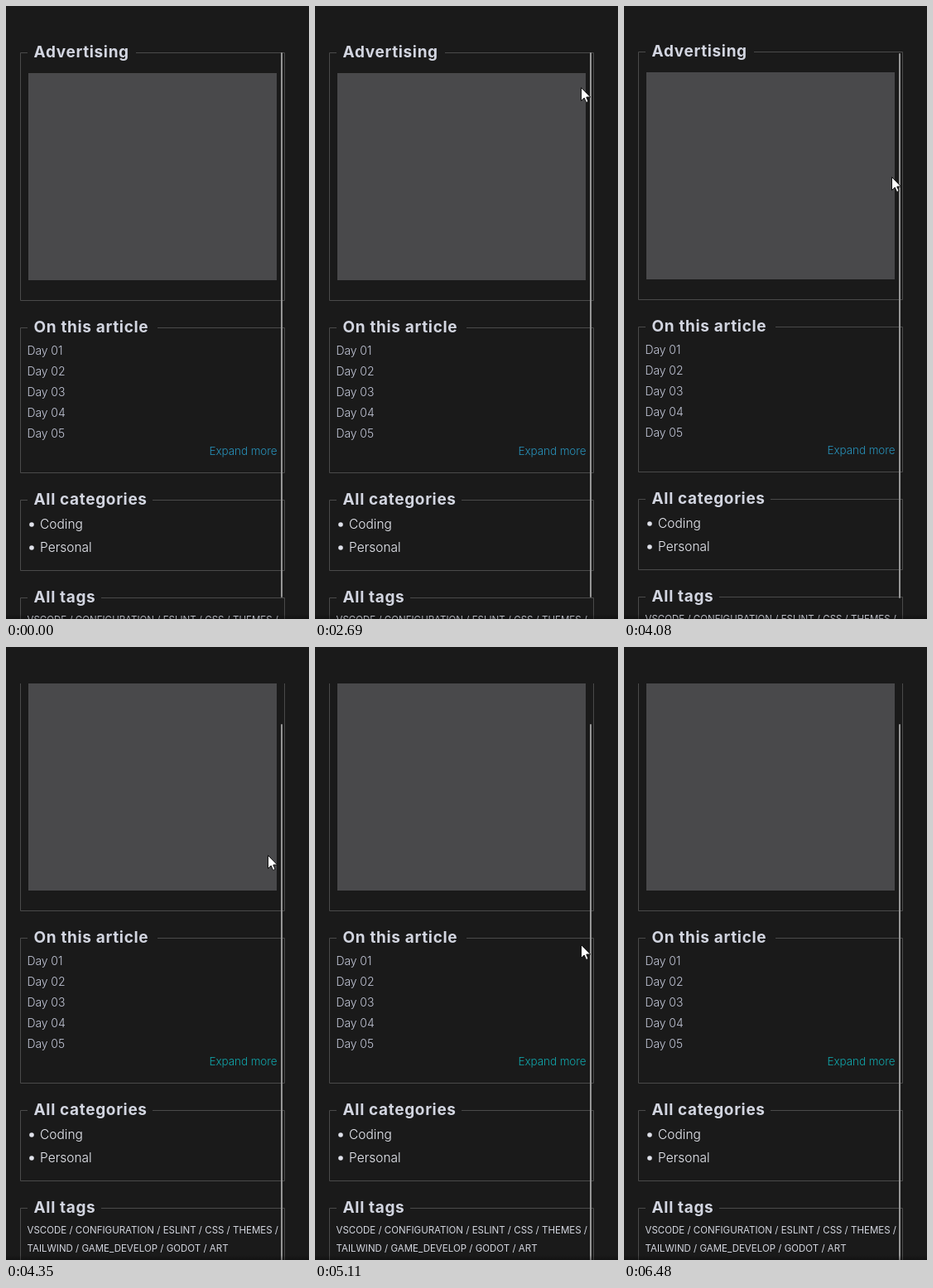
An HTML page that plays this animation: 366 by 740 pixels, repeating every 7010 ms.

```html
<!DOCTYPE html>
<html lang="en">
<head>
<meta charset="utf-8">
<title>Sidebar scroll</title>
<style>
  html, body { margin: 0; width: 100%; height: 100%; overflow: hidden; background: #1a1a1a; }
  svg { display: block; width: 366px; height: 740px; font-family: Inter, sans-serif; }
  .card { fill: none; stroke: #4a4a4a; }
  .title { font-size: 19px; font-weight: 700; letter-spacing: .65px; fill: #d2d5e0; }
  .day { font-size: 14px; font-weight: 300; letter-spacing: -.1px; fill: #c3c7d8; }
  .more { font-size: 13.5px; font-weight: 300; letter-spacing: -.1px; text-anchor: end; }
  .item { font-size: 15.5px; font-weight: 300; fill: #eceef5; }
  .tag { font-size: 11.5px; font-weight: 400; fill: #d4d7e0; }
</style>
</head>
<body>
<svg viewBox="0 0 366 740">
  <defs>
    <clipPath id="panel"><rect y="44" width="366" height="719"/></clipPath>
    <linearGradient id="shade" x2="0" y2="1">
      <stop stop-opacity="0"/><stop offset="1" stop-opacity=".3"/>
    </linearGradient>
  </defs>
  <rect width="366" height="740" fill="#1a1a1a"/>
  <g id="page" clip-path="url(#panel)">
    <g id="content"></g>
    <g id="track">
      <rect x="325" y="44" width="12" height="719" rx="6" fill="#171717"/>
      <path d="M331 47.5l3.5 5h-7z" fill="#959595"/>
    </g>
    <rect id="thumb" height="658" fill="#969696"/>
  </g>
  <rect y="734" width="366" height="6" fill="url(#shade)"/>
  <g id="toTop">
    <circle r="19" fill="#079b9d"/>
    <path d="M-7 0L0 -7L7 0M0 -7V8" fill="none" stroke="#14262b" stroke-width="2.5"/>
  </g>
  <path id="cursor" d="M.5 .5V16.5L4.2 13L6.6 18.5L9.1 17.4L6.8 12H11.7Z" fill="#fff" stroke="#111"/>
</svg>
<script>
const LOOP = 7010, TICK = 68.8, TICK_START = 1450;
const $ = id => document.getElementById(id);
const content = $('content');

function add(tag, attrs, text = '') {
  const el = document.createElementNS('http://www.w3.org/2000/svg', tag);
  for (const [k, v] of Object.entries(attrs)) el.setAttribute(k, v);
  el.textContent = text;
  content.append(el);
  return el;
}
const label = (cls, x, y, text) => add('text', { class: cls, x, y }, text);

function card(title, top, height, gapEnd) {
  add('path', { class: 'card', d: `M26 ${top}H17.5v${height}h319v${-height}H${gapEnd}` });
  label('title', 33.5, top + 5.5, title);
}

card('Advertising', 56.5, 299, 157);
card('On this article', 388.5, 175, 183);
card('All categories', 596.5, 85, 177);
card('All tags', 714.5, 73, 115);
add('rect', { x: 27, y: 81, width: 300, height: 250, fill: '#49494b' });
for (let i = 0; i < 5; i++) label('day', 25.5, 421 + 25 * i, `Day 0${i + 1}`);
const more = label('more', 327.5, 542, 'Expand more');
['Coding', 'Personal'].forEach((name, i) => {
  add('circle', { cx: 31, cy: 626 + 28 * i, r: 2.8, fill: '#dfe1ea' });
  label('item', 41, 631 + 28 * i, name);
});
['VSCODE / CONFIGURATION / ESLINT / CSS / THEMES /', 'TAILWIND / GAME_DEVELOP / GODOT / ART']
  .forEach((line, i) => label('tag', 25.5, 745 + 22 * i, line));

const linear = p => p;
const smooth = p => p * p * (3 - 2 * p);
const easeOut = p => 1 - (1 - p) ** 3;
const progress = (t, start, end) => Math.min(1, Math.max(0, (t - start) / (end - start)));
const ramp = (t, start, end) => smooth(progress(t, start, end));

// A stroke is a quadratic curve; without a bend it runs straight.
const stroke = (start, end, a, b, ease = linear, bend = [(a[0] + b[0]) / 2, (a[1] + b[1]) / 2]) => ({
  start, end,
  at(t) {
    const p = ease(progress(t, start, end)), q = 1 - p;
    return a.map((v, k) => Math.round(q * q * v + 2 * p * q * bend[k] + p * p * b[k]));
  }
});

// The pointer is visible from the first to the last moment of each visit.
const visits = [
  [stroke(142, 280, [258, 686], [-42, 356])],
  [
    stroke(1450, 2688, [7, 40], [321, 98], easeOut, [164, 2]),
    stroke(2688, 2894, [321, 98], [334, 108]),
    stroke(3180, 4060, [334, 108], [323, 205], smooth, [278, 150]),
    stroke(4060, 4610, [323, 205], [310, 295]),
    stroke(4610, 5096, [310, 295], [321, 359]),
    stroke(5096, 5790, [321, 359], [362, 420], smooth)
  ],
  [stroke(5990, 6440, [335, 430], [337, 492], linear, [298, 461])]
];

function pointerAt(t) {
  const visit = visits.find(v => t >= v[0].start && t < v.at(-1).end);
  return visit && visit.findLast(s => s.start <= t).at(t);
}

const move = (el, x, y) => el.setAttribute('transform', `translate(${x} ${y})`);
const show = (el, on) => el.setAttribute('visibility', on ? 'visible' : 'hidden');

function render(now) {
  const t = TICK_START + Math.floor((now % LOOP - TICK_START) / TICK) * TICK;
  const inner = Math.round(37 * ramp(t, 4030, 4340));
  const page = Math.round(28 * (ramp(t, 4340, 4610) - ramp(t, 4690, 5030)));
  const button = ramp(t, 4400, 4610) - ramp(t, 4700, 4900);
  const pointer = pointerAt(t);
  const hover = !!pointer && pointer[0] >= 325 && pointer[0] <= 337;

  move($('page'), 0, -page);
  move(content, 0, -inner);
  show($('track'), hover);
  const size = hover ? 6 : 2, thumb = $('thumb');
  thumb.setAttribute('x', 334 - size);
  thumb.setAttribute('width', size);
  thumb.setAttribute('rx', size / 2);
  thumb.setAttribute('y', 56 + inner);
  more.setAttribute('fill', inner > 1 ? '#10a5aa' : '#2790b8');
  move($('toTop'), 388 - 20 * button, 703);
  show($('cursor'), pointer);
  if (pointer) move($('cursor'), ...pointer);
}

function frame() {
  render(performance.now());
  requestAnimationFrame(frame);
}
frame();
</script>
</body>
</html>
```
